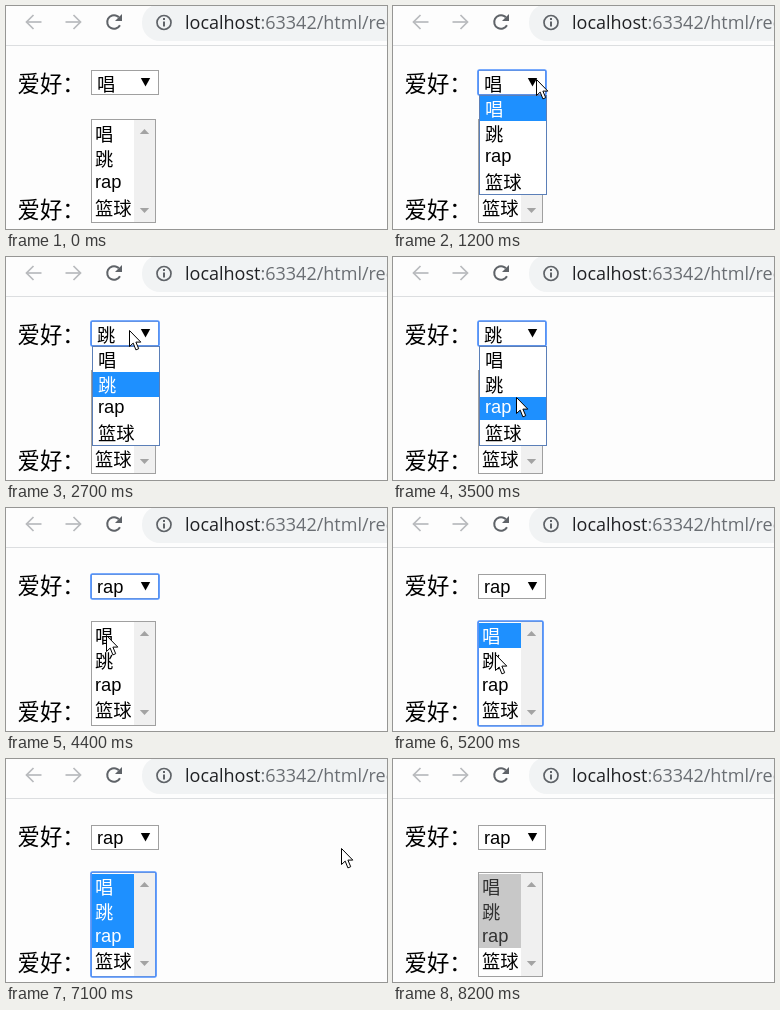
Write an HTML page with a canvas that moves like this. It is 381 by 223 pixels and loops after 8.3 s.

```html
<!DOCTYPE html>
<html lang="zh-CN">
<head>
<meta charset="utf-8">
<title>select</title>
<style>
html, body { margin: 0; width: 100%; height: 100%; overflow: hidden; background: #fdfdfd; }
canvas { display: block; }
</style>
</head>
<body>
<canvas id="stage" width="381" height="223"></canvas>
<script>
const ctx = document.getElementById('stage').getContext('2d');
const LOOP = 8300;
const CJK = '"Noto Sans CJK SC", "Noto Sans CJK JP", "Noto Sans CJK", sans-serif';
const LABEL_FONT = '22.4px ' + CJK;
const OPTION_FONT = '18.3px "Liberation Sans", ' + CJK;
const URL_FONT = '18px "Open Sans", sans-serif';
const PAGE = '#fdfdfd', BLUE = '#1e90ff', FOCUS = '#4d90fe', INK = '#000', ICON = '#5f6368';
const OPTIONS = ['唱', '跳', 'rap', '篮球'];
const ROW = 25;

// Cursor moves: first step time, number of 100 ms steps, from, to
const MOVES = [
  { at: 400, steps: 8, from: [318, 220], to: [143, 73] },
  { at: 1600, steps: 3, from: [143, 73], to: [124, 118] },
  { at: 2400, steps: 3, from: [124, 118], to: [123, 73] },
  { at: 3000, steps: 6, from: [123, 73], to: [123, 140] },
  { at: 4200, steps: 3, from: [123, 140], to: [100, 127] },
  { at: 5000, steps: 4, from: [100, 127], to: [102, 149] },
  { at: 5900, steps: 3, from: [102, 149], to: [103, 175] },
  { at: 6700, steps: 7, from: [103, 175], to: [392, 68] }
];

const within = (t, a, b) => t >= a && t < b;

function cursorAt(t) {
  const move = MOVES.filter(m => t >= m.at).pop();
  if (!move) return null;
  const p = Math.min(1, (Math.floor((t - move.at) / 100) + 1) / move.steps);
  const e = p * p * (3 - 2 * p);
  return move.from.map((v, i) => Math.round(v + (move.to[i] - v) * e));
}

function rect(x, y, w, h, color) {
  ctx.fillStyle = color;
  ctx.fillRect(x, y, w, h);
}

function frame(x, y, w, h, color) {
  ctx.strokeStyle = color;
  ctx.lineWidth = 1;
  ctx.strokeRect(x + 0.5, y + 0.5, w - 1, h - 1);
}

function focusRing(x, y, w, h) {
  ctx.strokeStyle = FOCUS;
  ctx.lineWidth = 1.7;
  ctx.beginPath();
  ctx.roundRect(x, y, w, h, 1.5);
  ctx.stroke();
}

function text(str, x, y, font, color = INK) {
  ctx.font = font;
  ctx.fillStyle = color;
  ctx.fillText(str, x, y);
}

function polygon(points, color) {
  ctx.beginPath();
  points.forEach(([x, y]) => ctx.lineTo(x, y));
  ctx.closePath();
  ctx.fillStyle = color;
  ctx.fill();
}

function triangle(x, y, half, height, color) {
  polygon([[x - half, y], [x + half, y], [x, y + height]], color);
}

function line(points, color, width) {
  ctx.beginPath();
  points.forEach(([x, y]) => ctx.lineTo(x, y));
  ctx.strokeStyle = color;
  ctx.lineWidth = width;
  ctx.stroke();
}

function arc(x, y, r, a, b, color, width) {
  ctx.beginPath();
  ctx.arc(x, y, r, a, b);
  ctx.strokeStyle = color;
  ctx.lineWidth = width;
  ctx.stroke();
}

function navArrow(x, dir) {
  const c = '#b8babd';
  line([[x - 8 * dir, 16], [x + 7 * dir, 16]], c, 1.7);
  line([[x, 9], [x - 0 + 7 * dir, 16], [x, 23]], c, 1.7);
}

function drawToolbar() {
  navArrow(27.5, -1);
  navArrow(67.5, 1);
  arc(108, 16, 6.8, 0.5, Math.PI * 1.75, ICON, 2);
  polygon([[116, 8], [116, 15], [109, 15]], ICON);

  ctx.fillStyle = '#f1f3f4';
  ctx.beginPath();
  ctx.roundRect(136, -2, 300, 37, 18);
  ctx.fill();
  arc(158, 16.5, 7, 0, Math.PI * 2, ICON, 1.7);
  rect(157, 12, 2, 2, ICON);
  rect(157, 15.5, 2, 5, ICON);

  text('localhost', 179, 23, URL_FONT, '#202124');
  const w = ctx.measureText('localhost').width;
  text(':63342/html/rec', 179 + w, 23, URL_FONT, '#6a6e73');
  rect(0, 39, 381, 1, '#dcdee0');
}

// A Latin value sits lower on the shared baseline, which nudges the layout by `drop`
function drawSelect(value, focused, drop) {
  const y = 64 + 2 * drop;
  rect(85, y, 68, 25, '#fff');
  frame(85, y, 68, 25, '#a0a0a0');
  if (focused) focusRing(85, y, 68, 25);
  text(value, 91, 85, OPTION_FONT);
  triangle(139.5, y + 8, 4.7, 8.5, INK);
}

function drawRows(x, textX, top, width, latin, chosen, fill, ink) {
  let y = top;
  OPTIONS.forEach((name, i) => {
    const isLatin = name === 'rap';
    const height = isLatin ? latin.height : ROW;
    const on = chosen.includes(i);
    if (on) rect(x, y, width, height, fill);
    text(name, textX, y + (isLatin ? latin.base : 19.5), OPTION_FONT, on ? ink : INK);
    y += height;
  });
}

function drawList(chosen, focused, active, drop) {
  const height = 104 + drop;
  const latin = { height: 24, base: 17 + drop };
  rect(85, 113, 65, height, '#fff');
  drawRows(86, 89, 115, 42, latin, chosen, active ? BLUE : '#c8c8c8', active ? '#fff' : '#323232');
  rect(128, 114, 21, height - 2, '#f0f0f0');
  triangle(138.5, 128, 4.7, -5, '#a3a3a3');
  triangle(138.5, 202, 4.7, 5, '#a3a3a3');
  frame(85, 113, 65, height, '#a0a0a0');
  if (focused) focusRing(85, 113, 65, height);
}

function drawPopup(hover) {
  rect(86, 89, 68, 100, '#fff');
  drawRows(87, 92, 90, 66, { height: 23, base: 16 }, [hover], BLUE, '#fff');
  frame(86, 89, 68, 100, '#5b7fb8');
}

function drawCursor([x, y]) {
  ctx.save();
  ctx.translate(x + 0.5, y + 0.5);
  polygon([[0, 0], [0, 16], [3.7, 12.6], [6.4, 19.4], [9.2, 18.2], [6.4, 11.6], [11.3, 11.6]], '#fff');
  ctx.strokeStyle = INK;
  ctx.lineWidth = 1;
  ctx.stroke();
  ctx.restore();
}

function draw(t) {
  const cursor = cursorAt(t);
  const value = t < 2200 ? '唱' : t < 3800 ? '跳' : 'rap';
  const drop = value === 'rap' ? 1 : 0;
  const open = within(t, 1200, 2200) || within(t, 2700, 3800);
  const chosen = [4700, 5500, 6500].flatMap((at, i) => t >= at ? [i] : []);

  rect(0, 0, 381, 223, PAGE);
  drawToolbar();
  text('爱好：', 11.5, 85.5, LABEL_FONT);
  text('爱好：', 11.5, 211.5, LABEL_FONT);
  drawSelect(value, within(t, 1200, 4700), drop);
  drawList(chosen, within(t, 4700, 8200), t < 8200, drop);

  if (open) {
    const y = cursor[1];
    drawPopup(y < 90 ? OPTIONS.indexOf(value) : Math.floor((y - 90) / ROW));
  }
  if (cursor && t < 7300) drawCursor(cursor);
}

const start = performance.now();
function tick() {
  draw((performance.now() - start) % LOOP);
  requestAnimationFrame(tick);
}
tick();
</script>
</body>
</html>
```
